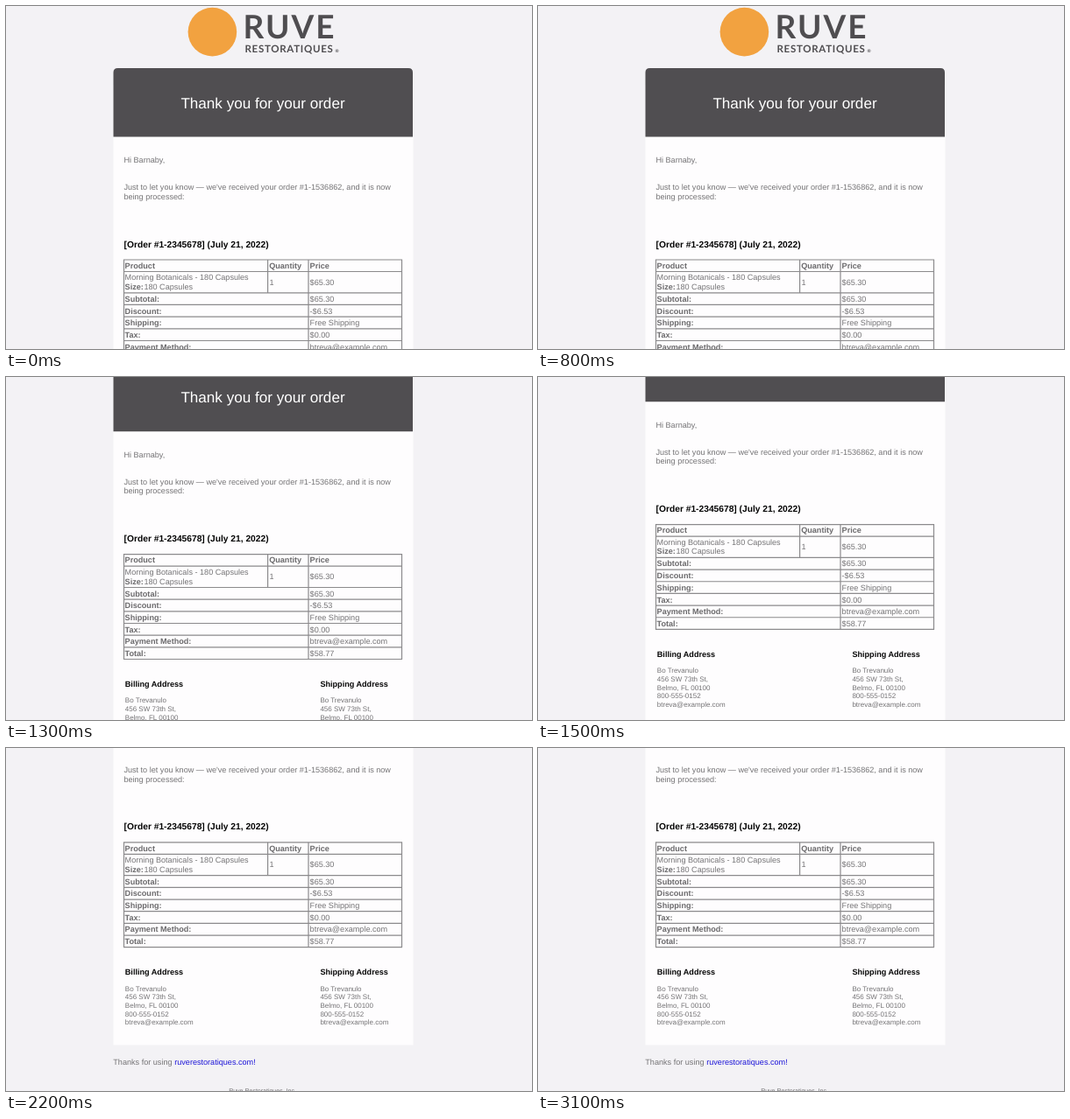
Write an HTML page that moves like this. It is 600x392 px and loops after 3300 ms.

```html
<!DOCTYPE html>
<html lang="en">
<head>
<meta charset="utf-8">
<title>Order confirmation</title>
<style>
  html, body { margin: 0; width: 100%; height: 100%; overflow: hidden; background: #f3f2f5; }
  svg { display: block; width: 100%; height: 100%; }
  text {
    font-family: "Liberation Sans", Arial, sans-serif;
    font-size: 9.1px;
    fill: #747375;
    text-rendering: geometricPrecision;
    white-space: pre;
  }
  .brand { font-family: Lato, sans-serif; font-weight: 700; fill: #4f4d50; }
  .bold { font-weight: 700; fill: #6a696b; }
  .black { font-weight: 700; fill: #050505; }
  .order { font-size: 10.24px; }
  .small { font-size: 8px; }
  .title { font-size: 17.1px; fill: #fff; }
  .foot { font-size: 7px; }
</style>
</head>
<body>
<svg viewBox="0 0 600 392" preserveAspectRatio="none">
  <rect width="600" height="392" fill="#f3f2f5"/>
  <g id="page">
    <circle cx="235.4" cy="29.6" r="27.8" fill="#f2a240"/>
    <rect x="122.5" y="90" width="342" height="431.6" fill="#fefdfe"/>
    <path d="M122.5 149.6V76q0-5 5-5H459q5 0 5 5V149.6z" fill="#504e51"/>
    <path id="grid" fill="none" stroke="#8b8a8c" stroke-width="1.2"/>
  </g>
</svg>
<script>
const page = document.getElementById("page");

function put(x, y, str, cls = "", attrs = {}) {
  const el = document.createElementNS("http://www.w3.org/2000/svg", "text");
  el.setAttribute("x", x);
  el.setAttribute("y", y);
  el.setAttribute("class", cls);
  for (const key in attrs) el.setAttribute(key, attrs[key]);
  el.textContent = str;
  page.append(el);
  return el;
}

// Masthead and greeting
put(270.5, 37, "RUVE", "brand", { style: "font-size:37px;letter-spacing:2px" });
put(272.5, 52.6, "RESTORATIQUES", "brand", { style: "font-size:11.5px;letter-spacing:.7px" });
put(375.4, 52.6, "®", "brand", { style: "font-size:5px" });
put(293, 116.5, "Thank you for your order", "title", { "text-anchor": "middle" });
put(134.4, 179, "Hi Barnaby,");
put(134.4, 210.2, "Just to let you know — we've received your order #1-1536862, and it is now");
put(134.4, 220.7, "being processed:");
put(134.6, 275.5, "[Order #1-2345678] (July 21, 2022)", "black order");

// Order table
const left = 134.5, right = 451.5, qty = 298.6, price = 345;
const top0 = 290, top1 = 303.5, top2 = 327.8, pitch = 13.67;
const mail = "btreva@example.com";
const rows = [
  ["Subtotal:", "$65.30"], ["Discount:", "-$6.53"], ["Shipping:", "Free Shipping"],
  ["Tax:", "$0.00"], ["Payment Method:", mail], ["Total:", "$58.77"]
];
const bottom = top2 + rows.length * pitch;
let lines = `M${left} ${top0}H${right}V${bottom}H${left}z`
  + `M${left} ${top1}H${right}M${qty} ${top0}V${top2}M${price} ${top0}V${bottom}`;

put(135.6, 299.8, "Product", "bold");
put(300.2, 299.8, "Quantity", "bold");
put(346.6, 299.8, "Price", "bold");
put(135.6, 313.2, "Morning Botanicals - 180 Capsules");
put(135.6, 323.9, "Size:", "bold");
put(157.4, 323.9, "180 Capsules");
put(300.4, 318.5, "1");
put(346.6, 318.5, "$65.30");
rows.forEach(([label, value], i) => {
  const y = top2 + i * pitch;
  lines += `M${left} ${y}H${right}`;
  put(135.6, y + 10.1, label, "bold");
  put(346.6, y + 10.1, value);
});
document.getElementById("grid").setAttribute("d", lines);

// Addresses and footer
const address = ["Bo Trevanulo", "456 SW 73th St,", "Belmo, FL 00100", "800-555-0152", mail];
for (const [x, kind] of [[135.8, "Billing"], [358.4, "Shipping"]]) {
  put(x, 441.2, kind + " Address", "black");
  address.forEach((line, i) => put(x, 459.8 + i * 9.65, line, "small"));
}
put(122.3, 544.4, "Thanks for using ");
put(192.2, 544.4, "ruverestoratiques.com!", "", { style: "fill:#1c14d8" });
put(292.5, 576.3, "Ruve Restoratiques, Inc.", "foot", { "text-anchor": "middle" });

// Three eased wheel notches, sampled every 100 ms
const LOOP = 3300, NOTCH = 60.7, GLIDE = 240;
const starts = [800, 1190, 1615];

function ease(p) {
  p = Math.min(1, Math.max(0, p));
  return p * p * (3 - 2 * p);
}

function draw(now) {
  const t = Math.floor((now % LOOP) / 100) * 100;
  const scroll = starts.reduce((sum, s) => sum + NOTCH * ease((t - s) / GLIDE), 0);
  page.setAttribute("transform", `translate(0 ${-scroll.toFixed(1)})`);
}

let begin = null;
function tick(now) {
  if (begin === null) begin = now;
  draw(now - begin);
  requestAnimationFrame(tick);
}
draw(0);
requestAnimationFrame(tick);
</script>
</body>
</html>
```
